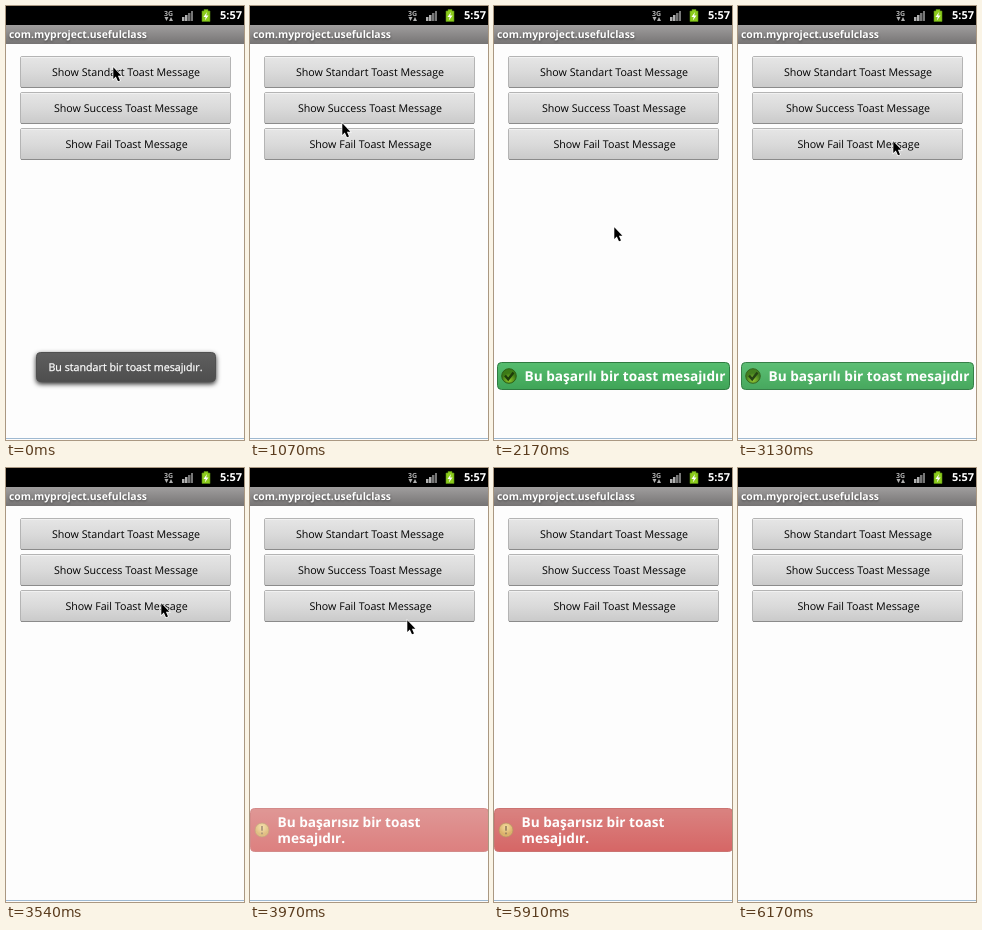
Animation, 238 px wide and 434 px high, one loop 6390 ms. Source, as an HTML page:

```html
<!DOCTYPE html>
<html lang="tr">
<head>
<meta charset="utf-8">
<title>Toast messages</title>
<style>
html, body { margin: 0; width: 100%; height: 100%; overflow: hidden; background: #fdfdfd; }
svg { display: block; width: 238px; height: 434px; }
text { font: 10.7px "Open Sans", "Noto Sans", sans-serif; text-rendering: geometricPrecision; }
.bold { font-weight: 700; fill: #fff; }
.big { font-size: 13.65px; }
.mid { text-anchor: middle; }
.soft { filter: drop-shadow(0 1px 1px rgba(0, 0, 0, .45)); }
.lift { filter: drop-shadow(0 2px 2.5px rgba(0, 0, 0, .85)); }

.cursor, .press, .toast { animation: 6.39s step-end infinite; }
.press, .toast { opacity: 0; }
.cursor { transform: translate(107px, 61px); animation-name: cursor; }
.second { animation-name: second; }
.third { animation-name: third; }
.plain { opacity: 1; animation-name: plain; }
.success { animation-name: success; }
.fail { animation-name: fail; }

@keyframes cursor {
  2.5% { transform: translate(107px, 63px); }
  4.8% { transform: translate(106px, 70px); }
  7.1% { transform: translate(103px, 80px); }
  9.4% { transform: translate(100px, 91px); }
  11.7% { transform: translate(96px, 103px); }
  14% { transform: translate(93px, 113px); }
  16.3% { transform: translate(92px, 117px); }
  22.86% { transform: translate(96px, 150px); }
  25.08% { transform: translate(104px, 215px); }
  27.29% { transform: translate(112px, 300px); }
  29.5% { transform: translate(116px, 371px); }
  31.7% { transform: translate(118px, 310px); }
  33.92% { transform: translate(120px, 221px); }
  36.14% { transform: translate(136px, 171px); }
  38.02% { transform: translate(142px, 160px); }
  40.2% { transform: translate(148px, 149px); }
  42.4% { transform: translate(153px, 140px); }
  44.6% { transform: translate(155px, 135px); }
  61.76% { transform: translate(157px, 152px); }
  63.77% { transform: translate(160px, 215px); }
  65.76% { transform: translate(168px, 300px); }
  67.76% { transform: translate(175px, 371px); }
  72.6% { transform: translate(150px, 402px); }
  74.8% { transform: translate(130px, 437px); }
}
@keyframes second { 18.62% { opacity: 1; } 20.65% { opacity: 0; } }
@keyframes third { 59.78% { opacity: 1; } 61.76% { opacity: 0; } }
@keyframes plain {
  4.8% { opacity: .85; } 7.1% { opacity: .55; } 9.4% { opacity: .25; }
  11.7%, 99.99% { opacity: 0; }
}
@keyframes success {
  20.65% { opacity: .5; } 22.86% { opacity: .9; } 25.08% { opacity: 1; }
  48.95% { opacity: .96; } 51.12% { opacity: .7; } 53.25% { opacity: .35; } 55.39% { opacity: 0; }
}
@keyframes fail {
  61.76% { opacity: .54; } 63.77% { opacity: .9; } 65.76% { opacity: 1; }
  90.45% { opacity: .92; } 92.48% { opacity: .65; } 94.52% { opacity: .3; } 96.54% { opacity: 0; }
}
</style>
</head>
<body>
<svg viewBox="0 0 238 434">
  <defs>
    <linearGradient id="bar" x2="0" y2="1"><stop stop-color="#a09e9e"/><stop offset="1" stop-color="#767474"/></linearGradient>
    <linearGradient id="key" x2="0" y2="1"><stop stop-color="#e6e6e6"/><stop offset=".5" stop-color="#dadada"/><stop offset="1" stop-color="#cacaca"/></linearGradient>
    <linearGradient id="hot" x2="0" y2="1"><stop stop-color="#ffc02e"/><stop offset="1" stop-color="#f79a0c"/></linearGradient>
    <linearGradient id="gray" x2="0" y2="1"><stop stop-color="#5f5f5f"/><stop offset="1" stop-color="#4e4e4e"/></linearGradient>
    <linearGradient id="green" x2="0" y2="1"><stop stop-color="#56bd6f"/><stop offset="1" stop-color="#3fa457"/></linearGradient>
    <linearGradient id="red" x2="0" y2="1"><stop stop-color="#c7413e"/><stop offset="1" stop-color="#c11514"/></linearGradient>
    <radialGradient id="gold" cy=".3"><stop stop-color="#f3cf70"/><stop offset="1" stop-color="#c98a1c"/></radialGradient>
    <radialGradient id="leaf" cy=".8"><stop stop-color="#8fc52c"/><stop offset="1" stop-color="#3c7a16"/></radialGradient>
    <g id="button">
      <rect x="14.5" y=".5" width="210" height="31" rx="1.5" fill="url(#key)" stroke="#b4b4b4"/>
      <path d="M15 1.5H224" stroke="#f1f1f1"/>
      <path d="M15 31.5H224" stroke="#8b8b8b"/>
    </g>
    <rect id="glow" x="14.5" y=".5" width="210" height="31" rx="1.5" fill="url(#hot)" stroke="#c98a2a"/>
  </defs>

  <rect width="238" height="434" fill="#fdfdfd"/>
  <rect width="238" height="19" fill="#000"/>
  <rect y="19" width="238" height="19" fill="url(#bar)"/>
  <path d="M0 432.5H238" stroke="#9fb9d1"/>

  <g fill="#b0b0b0">
    <text x="162.5" y="10" class="mid" style="font-size:7px;font-weight:700">3G</text>
    <path d="M158.5 11h4l-2 4zM163 15h4l-2-4z"/>
    <path d="M176 11h2.500v4H176zM179 9h2.500v6H179z"/>
    <path d="M182 7h2.500v8H182zM185 5h2v10h-2z" fill="#777"/>
  </g>
  <g transform="translate(0 .5)">
    <path d="M198 3h4v1.500h2v10.500h-8V4.500h2z" fill="#8ccc1c" stroke="#5a8f14" stroke-width=".6"/>
    <path d="M201 5.500l-3.500 5h2.200l-.8 3.500 3.600-5h-2.300z" fill="#fff"/>
  </g>
  <text x="214" y="13" class="bold" style="font-size:11px">5:57</text>
  <text x="3" y="32" class="bold soft" style="font-size:10.4px">com.myproject.usefulclass</text>

  <use href="#button" y="50"/>
  <use href="#button" y="86"/>
  <use href="#button" y="122"/>
  <use href="#glow" y="86" class="press second"/>
  <use href="#glow" y="122" class="press third"/>
  <g class="mid">
    <text x="120" y="70">Show Standart Toast Message</text>
    <text x="120" y="106">Show Success Toast Message</text>
    <text x="120.500" y="142">Show Fail Toast Message</text>
  </g>

  <g class="toast plain">
    <rect x="30.500" y="346.500" width="179" height="29" rx="4" fill="url(#gray)" stroke="#505050" class="lift"/>
    <text x="119.500" y="365" class="mid" fill="#fff" stroke="#fff" stroke-width=".25">Bu standart bir toast mesajıdır.</text>
  </g>

  <g class="toast success">
    <rect x="3.500" y="356.500" width="232" height="27" rx="4" fill="url(#green)" stroke="#2f7a40"/>
    <circle cx="15" cy="370" r="7.300" fill="url(#leaf)" stroke="#2a5a14" stroke-width=".9"/>
    <path d="M11 369.500l3.200 3.800 5.300-6.800" fill="none" stroke="#1d3d0a" stroke-width="2.400"/>
    <text x="30.500" y="375" class="bold big">Bu başarılı bir toast mesajıdır</text>
  </g>

  <g class="toast fail">
    <rect x=".5" y="340.500" width="238" height="43" rx="4" fill="url(#red)" stroke="#b02a28"/>
    <circle cx="12" cy="362" r="7" fill="url(#gold)" stroke="#8f5a16" stroke-width=".7"/>
    <path d="M12 358v4.800M12 364.500v1.800" stroke="#6b4310" stroke-width="1.800"/>
    <text x="27.500" y="359" class="bold big">Bu başarısız bir toast</text>
    <text x="27.500" y="375" class="bold big">mesajıdır.</text>
  </g>

  <path class="cursor" d="M.3 .3V12L2.800 9.600 5 14.300 7 13.500 4.900 8.800H8.400Z" stroke="#fff" stroke-width="1.300" paint-order="stroke"/>
</svg>
</body>
</html>
```
